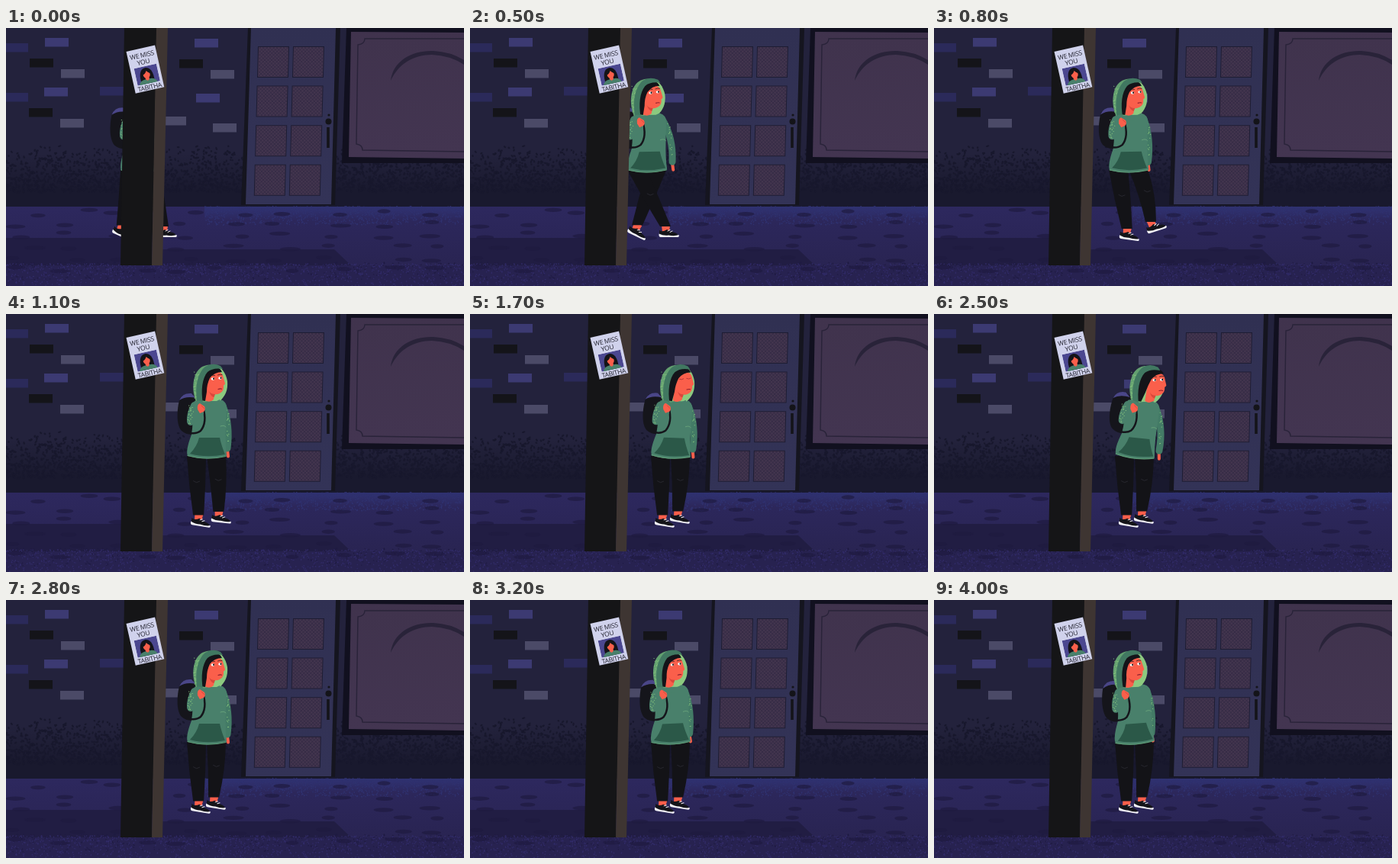
These frames come from a looping animation (600x338 px, 4.2 s). An HTML page with a canvas:

```html
<!DOCTYPE html>
<html lang="en">
<head>
<meta charset="utf-8">
<title>Night walk</title>
<style>
html, body { margin: 0; width: 100%; height: 100%; overflow: hidden; background: #23223d; }
canvas { display: block; width: 600px; height: 338px; }
</style>
</head>
<body>
<canvas id="stage" width="600" height="338"></canvas>
<script>
const LOOP = 4200, STEP = 100, W = 600, H = 338;
const BLACK = '#141419', WHITE = '#f1f0f6', SKIN = '#fa5f4b', GREEN = '#49806b', RIM = '#417861', LIGHT = '#8cc97f';
const stage = document.getElementById('stage').getContext('2d');
let ctx;

let seed = 7;
const rnd = () => (seed = seed * 16807 % 2147483647) / 2147483647;
const clamp = u => Math.max(0, Math.min(1, u));
const smooth = u => u * u * (3 - 2 * u);
const ramp = (t, start, end) => smooth(clamp((t - start) / (end - start)));

function layer(draw) {
  const c = document.createElement('canvas');
  c.width = W;
  c.height = H;
  ctx = c.getContext('2d');
  draw();
  return c;
}
function fill(d, color) {
  ctx.fillStyle = color;
  ctx.fill(new Path2D(d));
}
function line(d, color, width) {
  ctx.strokeStyle = color;
  ctx.lineWidth = width;
  ctx.stroke(new Path2D(d));
}
function rect(x, y, w, h, color) {
  ctx.fillStyle = color;
  ctx.fillRect(x, y, w, h);
}
function oval(x, y, rx, ry, color, turn = 0) {
  ctx.fillStyle = color;
  ctx.beginPath();
  ctx.ellipse(x, y, rx, ry, turn, 0, 7);
  ctx.fill();
}
function fade(y0, y1, from, to) {
  const g = ctx.createLinearGradient(0, y0, 0, y1);
  g.addColorStop(0, from);
  g.addColorStop(1, to);
  return g;
}
function clipped(x, y, w, h, draw) {
  ctx.save();
  ctx.beginPath();
  ctx.rect(x, y, w, h);
  ctx.clip();
  draw();
  ctx.restore();
}
// Draws turned about a pivot and moved sideways.
function turned(x, y, angle, shift, draw) {
  ctx.save();
  ctx.translate(x + shift, y);
  ctx.rotate(angle);
  ctx.translate(-x, -y);
  draw();
  ctx.restore();
}
// Dots between two heights; bias > 1 crowds them at y0, bias < 1 at y1.
function speckle(n, x0, x1, y0, y1, bias, color, size) {
  for (let i = 0; i < n; i++) {
    const x = x0 + rnd() * (x1 - x0), y = y0 + rnd() ** bias * (y1 - y0);
    oval(x, y, size * (.6 + rnd() * .6), size * .6, color, rnd() * 3);
  }
}

function wall() {
  const [dim, blue, grey] = ['#2b2a5a', '#3c3a72', '#4b4a67'];
  const brick = (x, y, color) => rect(x, y, 31, 11.5, color);
  const cluster = (x, y) => {
    brick(x, y, blue);
    brick(x - 20, y + 27, BLACK);
    brick(x + 21, y + 41, grey);
  };
  rect(0, 0, W, 235, '#23223c');
  cluster(51, 13);
  cluster(50, 78);
  cluster(247, 14);
  brick(249, 86, blue);
  brick(205, 116, grey);
  brick(271, 125, grey);
  brick(-2, 20, dim);
  brick(-2, 85, dim);
  brick(123, 77, dim);
  rect(0, 160, W, 75, fade(165, 212, '#19192e00', '#19192e'));
  speckle(2300, 0, W, 154, 215, .55, '#18182d', 1.9);
}

function ground() {
  rect(0, 234, W, 104, fade(234, 312, '#2d285e', '#292452'));
  rect(260, 234, 340, 18, fade(236, 252, '#2f3170', '#2f317000'));
  speckle(900, 260, W, 234, 258, 1.3, '#30326f', 1.2);
  fill('M0 275H152V311H0Z', '#211d43');
  fill('M200 290H430L452 311H200Z', '#211d43');
  rect(0, 311, W, 27, '#272250');
  speckle(1100, 0, W, 309, 338, 1.5, '#322c69', 1.1);
  speckle(350, 0, W, 307, 330, 1.5, '#1f1b42', 1);
  for (let i = 0; i < 54; i++) {
    const x = i % 9 * 68 + rnd() * 50, y = 238 + Math.floor(i / 9) * 15 + rnd() * 8;
    oval(x, y, 8 + rnd() * 6, 2.7, '#1e1a40b0');
  }
}

function door() {
  fill('M317 0H438L431 232H308Z', '#15151f');
  fill('M321 0H432L426 231H314Z', fade(0, 231, '#303052', '#333357'));
  for (let row = 0; row < 4; row++) for (let col = 0; col < 2; col++) {
    ctx.save();
    ctx.transform(1, 0, -.025, 1, 330 + col * 46 - row * 1.4, 24 + row * 51.6);
    rect(0, 0, 41, 41, '#1e1d33');
    rect(1, 1, 39, 39, '#43354e');
    clipped(1, 1, 39, 39, () => {
      for (let k = -40; k < 80; k += 4.5) line(`M${k} 0l40 40M${k} 0l-40 40`, '#322a44', .8);
    });
    ctx.restore();
  }
  oval(423, 114, 1.6, 1.6, BLACK);
  oval(422.5, 122.5, 4, 4, BLACK);
  line('M422 130V157', BLACK, 3.6);
}

function billboard() {
  fill('M446 0H600V177H440Z', '#11101f');
  fill('M452 5L600 6V171L449 169Z', fade(5, 170, '#40334d', '#433551'));
  line('M600 14H470Q470 21 461 22L459 152Q467 153 467 160L600 162', '#292339', 1.4);
  fill('M504 69C507 43 532 29 560 30Q582 31 600 42V48Q582 36 558 35C534 35 514 47 504 69Z', '#292339');
}

function poster() {
  rect(0, 0, 38.5, 56, '#d0d2ec');
  clipped(5, 24, 30, 23, () => {
    rect(5, 24, 30, 23, '#4b4790');
    fill('M11 47C9 35 12 26 19 26C28 26 29 37 28 47Z', BLACK);
    fill('M7 48Q9 41 17 41H22Q30 41 32 48Z', GREEN);
    fill('M17 37H22V41Q19.500 45 17 41Z', SKIN);
    oval(19.5, 34.5, 4.6, 5.5, SKIN);
    fill('M14 35Q15 26 21 28Q25 30 25 35Q21 32 20 30Q18 34 14 35Z', BLACK);
  });
  ctx.fillStyle = '#20202c';
  ctx.textAlign = 'center';
  ctx.font = '8.5px "Open Sans", sans-serif';
  ctx.fontStretch = 'condensed';
  ctx.letterSpacing = '-0.3px';
  ctx.fillText('WE MISS', 19, 12);
  ctx.fillText('YOU', 19, 21);
  ctx.fillText('TABITHA', 20, 55);
}

function pole() {
  fill('M155 0H198L191 311H150Z', '#151517');
  fill('M197 0H212L205 311H191Z', '#3e3532');
  ctx.translate(157.5, 31);
  ctx.rotate(-.22);
  poster();
}

function leg(hx, hy, [x, y, tilt]) {
  ctx.save();
  ctx.translate(x, y);
  ctx.rotate(tilt);
  fill('M3-16H14L13-6H4Z', SKIN);
  fill('M0-9Q4-6 10-10L18-6.500Q25-5.500 25-1L0-1Z', BLACK);
  fill('M-.5-4.500Q6-1.500 12-2.500Q20-1 25.500-3Q26.500 0 24 0H2Q-1 0-.5-4.500Z', WHITE);
  line('M11-8l3-1.500M14-6.500l3-1.500', WHITE, 1);
  ctx.restore();
  const ax = x + 8 * Math.cos(tilt) + 14 * Math.sin(tilt);
  const ay = y + 8 * Math.sin(tilt) - 14 * Math.cos(tilt);
  const dx = ax - hx, dy = ay - hy, d = Math.hypot(dx, dy);
  const bend = Math.sqrt(Math.max(0, 1369 - d * d / 4)) * .4;
  const kx = hx + dx / 2 + dy / d * bend, ky = hy + dy / 2 - dx / d * bend;
  fill(`M${hx - 12} ${hy}Q${kx - 11} ${ky} ${ax - 7} ${ay}H${ax + 7}Q${kx + 11} ${ky} ${hx + 13} ${hy}Z`, '#131317');
  line(`M${kx - 5} ${ky - 6}l4 2l4-1.500`, '#2c2c35', .8);
}

function dots(n, x, y, dx, dy, spread) {
  seed = 99;
  for (let i = 0; i < n; i++) {
    const u = rnd();
    oval(x + dx * u + (rnd() - .5) * spread, y + dy * u, .7, .5, LIGHT);
  }
}

function eye(x, y, closed) {
  if (closed) return line(`M${x - 3} ${y}q3 1.500 5.500-.5`, '#a52f35', .8);
  oval(x, y, 2.3, 1.7, '#fff');
  oval(x + 1, y - .2, 1, 1.2, BLACK);
  line(`M${x - 3} ${y - 4}q3-1.500 5.500-.5`, BLACK, .7);
}

function head(look, closed) {
  fill('M251 119C243 104 244 86 250 76C255 68 263 66 270 67L264 114Z', '#63a070');
  dots(50, 251, 76, -1, 34, 9);
  fill('M268 67C280 65 288 76 290 88C291 100 287 108 280 114H260Z', LIGHT);
  ctx.save();
  ctx.translate(look, 0);
  fill('M263 84Q268 74 276 75Q284 76 285 84L287 91Q286.500 93 285 93.500Q286 101 280 104Q276 106 273 105L272 112Q267 117 260 113Z', SKIN);
  fill('M274 105Q268 105 266 101Q268 108 272.500 109Z', '#d9473b');
  eye(271, 85, closed);
  eye(280.5, 84, closed);
  line('M278 98.500q3-1 4.500-.3', '#8c1f2c', 1.1);
  ctx.restore();
  fill(`M255 113C253 92 259 74 272 69Q${280 + look} 69 ${283 + look} 76Q${273 + look} 76 ${267 + look} 84Q${263 + look} 92 ${263 + look / 2} 102L261 114Z`, BLACK);
  fill('M281 68Q270 63 261 69C250 78 247 98 251 119L258 117C255 100 257 84 264 76Q271 70 284 72Z', RIM);
}

function torso({ lean, shift, look, swing, closed }) {
  fill('M243 104Q230 104 227 113C223 130 224 147 230 153Q238 160 250 157L254 112Z', '#15151b');
  fill('M227 113Q231 103 243 104L249 110Q236 107 227 113Z', '#4a4688');
  const hand = 290 + swing;
  line(`M${hand} 178l1 8.500`, SKIN, 4);
  line(`M284 120Q${294 + swing * .7} 145 ${hand} 176`, '#437b66', 9);
  dots(16, 291 + swing * .3, 126, swing * .5, 42, 4);
  fill('M247 114Q262 108 281 112Q289 114 289 124L288 150Q287 170 289 186Q264 193 238 186Q235 179 243 158Q246 140 243 124Z', GREEN);
  fill('M253 162H280Q282 172 287 184Q262 189 241 183Q250 174 253 162Z', '#2b5848');
  line('M238 185.500Q262 192 288 186.500', '#5d9a76', 1.2);
  line('M281 147q5-2 7 1', '#6aa57c', .9);
  turned(266, 114, -lean / 2, shift, () => head(look, closed));
  fill('M247 115Q251 112 258 115Q267 119 280 112Q284 119 270 122Q252 122 247 115Z', GREEN);
  line('M258 122Q264 142 255 153Q250 157 242 156', '#15151b', 2.5);
  line('M247 120Q241 132 242 141L254 129', GREEN, 10);
  dots(24, 243, 120, -3, 24, 7);
  fill('M251 125Q250 118 254 117L260 121Q262 125 259 128L254 130Z', SKIN);
  line('M256 120l4 4', '#cf4036', .7);
}

// One stride of a foot, then a short shuffle back: heel x, heel y, tilt.
function stride(t, start, end, from, to, shuffle, drop) {
  const u = clamp((t - start) / (end - start)), rest = ramp(t, end, end + 400);
  return [
    from + (to - from) * smooth(u) - shuffle * rest,
    274 - 12 * Math.sin(Math.PI * u) + drop * rest,
    .48 * Math.sin(2 * Math.PI * u) + .16 * rest,
  ];
}

function person(t) {
  const x = -87 * (1 - clamp(t / 1000)) ** 1.5;
  const walking = 1 - ramp(t, 700, 1100);
  const forward = ramp(t, 1300, 2300) - ramp(t, 2500, 2800);
  const back = ramp(t, 2900, 3500);
  const lean = .1 * forward - .08 * back - .02 * walking;
  leg(275 + x, 186, stride(t, 420, 850, 198, 284, 22, -3));
  leg(249 + x, 186, stride(t, -100, 500, 130, 248, 6, 2));
  turned(262, 187, lean, x, () => torso({
    lean,
    shift: 3 * forward - 4 * back - 2 * walking,
    look: 6 * forward - back,
    swing: 4 * forward - 4 * back - 6 * walking * Math.cos(Math.PI * t / 500),
    closed: t >= 1600 && t < 1800 || t >= 3700 && t < 3900,
  }));
}

const back = layer(() => { wall(); ground(); door(); billboard(); });
const front = layer(pole);
stage.lineCap = stage.lineJoin = 'round';

function frame() {
  const now = performance.now() - start;
  const t = Math.min(4000, Math.floor(now % LOOP / STEP) * STEP);
  ctx = stage;
  ctx.drawImage(back, 0, 0);
  person(t);
  ctx.drawImage(front, 0, 0);
  requestAnimationFrame(frame);
}
const start = performance.now();
frame();
</script>
</body>
</html>
```
